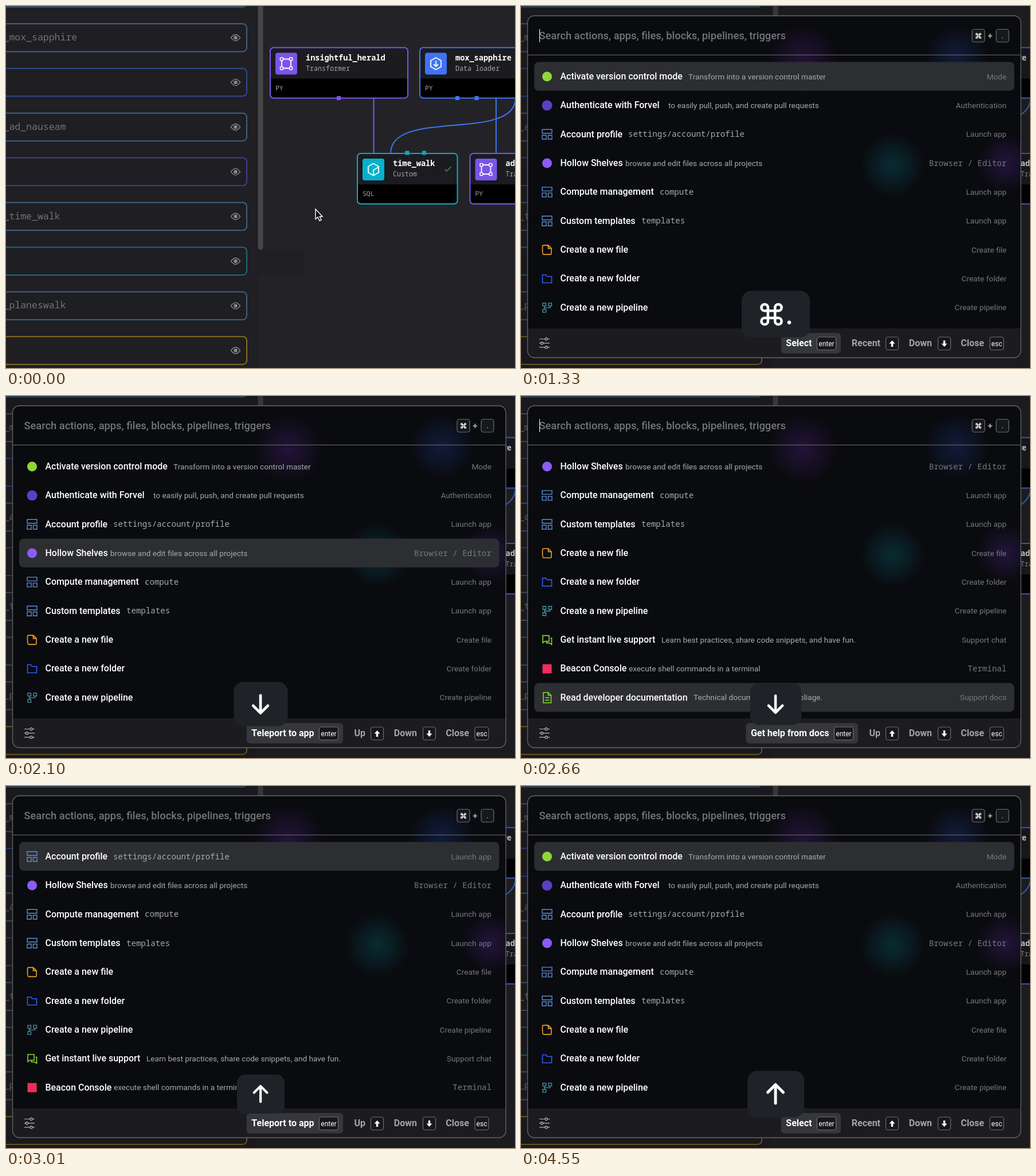
Animation, 888 px wide and 631 px high, one loop 4.62 s. Source, as an HTML page with a canvas:

```html
<!DOCTYPE html>
<html lang="en">
<head>
<meta charset="utf-8">
<title>Command palette</title>
<style>
html, body { margin: 0; width: 100%; height: 100%; overflow: hidden; background: #222226; }
canvas { display: block; width: 888px; height: 631px; }
</style>
</head>
<body>
<canvas id="stage" width="888" height="631"></canvas>
<script>
const c = document.getElementById('stage').getContext('2d');
const LOOP = 4620;
const SANS = 'Roboto, sans-serif';
const MONO = '"Noto Sans Mono", "DejaVu Sans Mono", monospace';
const PURPLE = '#7b54ea', BLUE = '#4073f4', TEAL = '#0fa9bf';

function text(s, x, y, font, color, align = 'left') {
  c.font = font;
  c.fillStyle = color;
  c.textAlign = align;
  c.fillText(s, x, y);
}

function box(x, y, w, h, r, fill, stroke, lw = 1) {
  c.beginPath();
  c.roundRect(x, y, w, h, r);
  if (fill) { c.fillStyle = fill; c.fill(); }
  if (stroke) { c.strokeStyle = stroke; c.lineWidth = lw; c.stroke(); }
}

function line(d, color, lw = 1.5) {
  c.strokeStyle = color;
  c.lineWidth = lw;
  c.stroke(new Path2D(d));
}

function disc(x, y, r, fill) {
  c.beginPath();
  c.arc(x, y, r, 0, 7);
  c.fillStyle = fill;
  c.fill();
}

function at(x, y, scale, draw) {
  c.save();
  c.translate(x, y);
  c.scale(scale, scale);
  draw();
  c.restore();
}

// Linear interpolation through [time, value] points
function track(points, t) {
  for (let i = 1; i < points.length; i++) {
    const [a, u] = points[i - 1], [b, v] = points[i];
    if (t < b) return u + (v - u) * Math.max(0, (t - a) / (b - a));
  }
  return points[points.length - 1][1];
}

/* ---------- page behind the palette ---------- */

const cards = [
  ['', '#41607f'], ['_mox_sapphire', '#41607f'], ['', '#2f4b90'],
  ['_ad_nauseam', '#41607f'], ['', '#4b3a8c'], ['_time_walk', '#41607f'],
  ['', '#1f6a77'], ['_planeswalk', '#41607f'], ['', '#8a6d22']
];

function eye(x, y) {
  line(`M${x - 8} ${y}Q${x} ${y - 11} ${x + 8} ${y}Q${x} ${y + 11} ${x - 8} ${y}Z`, '#88888c', 1.4);
  disc(x, y, 3.2, '#88888c');
}

const glyphs = {
  transform() {
    line('M-8-8H8V8H-8Z', '#fff', 1.8);
    for (const x of [-8, 8]) for (const y of [-8, 8]) box(x - 2.5, y - 2.5, 5, 5, 1, PURPLE, '#fff', 1.6);
  },
  load() {
    line('M0-10.5L9-5.3V5.3L0 10.5L-9 5.3V-5.3ZM0-5V4.5M-4 1L0 5L4 1', '#fff', 1.8);
  },
  cube() {
    line('M0-10.5L9-5.3V5.3L0 10.5L-9 5.3V-5.3ZM0 10V1L8.5-4', '#fff', 1.8);
  }
};

function node(x, y, w, color, tile, glyph, title, kind, lang) {
  box(x, y, w, 88, 6, '#1b1b20');
  box(x, y + 54, w, 34, [0, 0, 6, 6], '#000');
  box(x, y, w, 88, 6, null, color, 2);
  box(x + 9, y + 9, 38, 38, 4, tile);
  at(x + 28, y + 28, 1, glyphs[glyph]);
  text(title, x + 62, y + 22, `700 13.6px ${MONO}`, '#fff');
  text(kind, x + 62, y + 40, `400 11.7px ${MONO}`, '#a4a4a8');
  text(lang, x + 9, y + 74, `400 11.4px ${MONO}`, '#a4a4a8');
}

function port(x, y, color) {
  c.fillStyle = color;
  c.fillRect(x - 3.5, y - 3.5, 7, 7);
}

function page() {
  c.fillStyle = '#232327';
  c.fillRect(0, 0, 888, 631);
  c.fillStyle = '#1f1f24';
  c.fillRect(0, 0, 440, 631);
  c.fillRect(440, 424, 80, 44);
  box(439.5, -10, 9, 435, 4.5, '#464649');

  cards.forEach(([name, color], i) => {
    const y = -47 + i * 77.9;
    box(-20, y, 440, 48.5, 7, '#1e1e23', color, 2);
    text(name, -4.5, y + 29, `400 16.5px ${MONO}`, '#737377');
    eye(400.5, y + 24.3);
  });

  line('M641.5 160V257', PURPLE, 2);
  line('M855 160V257M889 160C889 238 671 178 671 257', BLUE, 2);
  node(461, 72.5, 240, PURPLE, PURPLE, 'transform', 'insightful_herald', 'Transformer', 'PY');
  node(722, 72.5, 210, BLUE, BLUE, 'load', 'mox_sapphire', 'Data loader', 'PY');
  node(613, 257, 174.5, TEAL, '#05b2cc', 'cube', 'time_walk', 'Custom', 'SQL');
  node(809.5, 257, 200, PURPLE, PURPLE, 'transform', 'ad_nauseam', 'Transformer', 'PY');
  line('M765.5 284.5L769 288L776.5 280', '#2fa81c', 1.5);
  port(580.5, 160.5, PURPLE);
  port(787.5, 160.5, BLUE);
  port(821, 160.5, BLUE);
  port(700, 256, TEAL);
  port(729.5, 256, TEAL);
}

function pointer(alpha) {
  c.globalAlpha = alpha;
  const p = new Path2D('M540 354V371.5L544 368L547 374.5L550 373L547.2 367H552Z');
  c.fillStyle = '#111';
  c.fill(p);
  c.strokeStyle = '#fff';
  c.lineWidth = 1.4;
  c.stroke(p);
  c.globalAlpha = 1;
}

/* ---------- palette ---------- */

const icons = {
  mode() { disc(0, 0, 8.5, '#8fd63a'); },
  auth() { disc(0, 0, 9, '#5d3fc4'); },
  library() { disc(0, 0, 8.5, '#8b5cf6'); },
  terminal() { box(-8, -8, 16, 16, 0, '#ee2f5b'); },
  app() { line('M-8.5-8.5H8.5V-2H-8.5ZM-8.5 1.5H-1.5V8.5H-8.5ZM2 1.5H8.5V8.5H2Z', '#5c8fd6', 1.4); },
  file() {
    line('M-6-8H2L7.5-2.5V6Q7.5 8 5.5 8H-6Q-8 8-8-0V-6Q-8-8-6-8ZM2-8V-2.5H7.5', '#f0a51e', 1.6);
  },
  folder() { line('M-8-7H-2L0-4H8V7H-8Z', '#2f5cf5', 1.6); },
  flow() {
    line('M-7.5-8H-2V-3H-7.5ZM2.5-8H8V-3H2.5ZM-7.5 3H-2V8H-7.5ZM-4.8-3V3M5.3-3V0H-4.8', '#4799a8', 1.3);
  },
  chat() { line('M-7.5-7.5H3.5V2.5H-4L-7.5 5ZM6-3H8V8L4.5 5.5H-1V3', '#84dc2a', 1.6); },
  docs() { line('M-6.5-9H2L7-4V9H-6.5ZM2-9V-4H7M-3.5 0H4M-3.5 4.5H4', '#84dc2a', 1.5); }
};

// icon, title, detail, detail x, right label, mono detail, mono label, button
const items = [
  ['mode', 'Activate version control mode', 'Transform into a version control master', 292, 'Mode', 0, 0, 'Select'],
  ['auth', 'Authenticate with Forvel', 'to easily pull, push, and create pull requests', 257, 'Authentication', 0, 0, 'Conjure'],
  ['app', 'Account profile', 'settings/account/profile', 187, 'Launch app', 1, 0, 'Teleport to app'],
  ['library', 'Hollow Shelves', 'browse and edit files across all projects', 182, 'Browser / Editor', 0, 1, 'Teleport to app'],
  ['app', 'Compute management', 'compute', 242, 'Launch app', 1, 0, 'Teleport to app'],
  ['app', 'Custom templates', 'templates', 210, 'Launch app', 1, 0, 'Teleport to app'],
  ['file', 'Create a new file', '', 0, 'Create file', 0, 0, 'Conjure'],
  ['folder', 'Create a new folder', '', 0, 'Create folder', 0, 0, 'Conjure'],
  ['flow', 'Create a new pipeline', '', 0, 'Create pipeline', 0, 0, 'Conjure'],
  ['chat', 'Get instant live support', 'Learn best practices, share code snippets, and have fun.', 245, 'Support chat', 0, 0, 'Conjure'],
  ['terminal', 'Beacon Console', 'execute shell commands in a terminal', 188, 'Terminal', 0, 1, 'Teleport to app'],
  ['docs', 'Read developer documentation', 'Technical documentation for Foliage.', 301, 'Support docs', 0, 0, 'Get help from docs']
];

const face = mono => mono ? `400 14.1px ${MONO}` : `400 13.65px ${SANS}`;

function glow(x, y, r, rgb, alpha) {
  const g = c.createRadialGradient(x, y, 0, x, y, r);
  g.addColorStop(0, `rgba(${rgb},${alpha})`);
  g.addColorStop(0.5, `rgba(${rgb},${alpha * 0.55})`);
  g.addColorStop(1, `rgba(${rgb},0)`);
  c.fillStyle = g;
  c.fillRect(x - r, y - r, 2 * r, 2 * r);
}

function row([icon, title, detail, x, label, monoDetail, monoLabel], y, active) {
  if (active) box(23, y - 25, 837.5, 50.3, 8, '#2d2e32');
  at(45.5, y + 0.5, 1, icons[icon]);
  text(title, 68.5, y + 5.5, `500 15.95px ${SANS}`, '#fff');
  text(detail, x, y + 5, face(monoDetail), '#a9aaae');
  text(label, 847, y + 5, face(monoLabel), '#77787c', 'right');
}

function command(lw) {
  const d = 'M6.5-12.5V12.5A6 6 0 1 0 12.5 6.5H-12.5A6 6 0 1 0-6.5 12.5V-12.5A6 6 0 1 0-12.5-6.5H12.5A6 6 0 1 0 6.5-12.5Z';
  line(d, '#fff', lw);
}

function keycap(x, y, w, label) {
  box(x, y, w, 22.5, 4, '#17181b', '#6d6e72', 1.2);
  if (label) text(label, x + w / 2, y + 15.5, `400 12px ${SANS}`, '#fff', 'center');
}

function smallArrow(x, y, dir) {
  at(x, y, 1, () => {
    c.scale(1, dir);
    c.fillStyle = '#fff';
    c.fill(new Path2D('M0-5.5L5 0H1.7V5.5H-1.7V0H-5Z'));
  });
}

function footer(sel) {
  const font = `700 16px ${SANS}`, gray = '#a3a4a9';
  const edge = sel ? 537.5 : 507.5, label = items[sel][7];
  box(12, 562, 860, 51, [0, 0, 11, 11], '#1c1c20');
  for (let i = 0; i < 3; i++) {
    const y = 580.5 + i * 7.2, x = [44, 36.5, 44][i];
    line(`M32 ${y}H50`, '#b5b6ba', 1.2);
    c.beginPath();
    c.arc(x, y, 2.1, 0, 7);
    c.fillStyle = '#1c1c20';
    c.fill();
    c.stroke();
  }
  c.font = font;
  const w = c.measureText(label).width;
  box(edge - w - 8.5, 570, w + 59, 35.5, 6, '#36373c');
  text(label, edge, 593, font, '#fff', 'right');
  keycap(edge + 9, 577, 33, 'enter');
  text(sel ? 'Up' : 'Recent', 627, 593, font, gray, 'right');
  text('Down', 717, 593, font, gray, 'right');
  text('Close', 808, 593, font, gray, 'right');
  keycap(636.5, 577, 22, '');
  smallArrow(647.5, 588.5, 1);
  keycap(727.5, 577, 22, '');
  smallArrow(738.5, 588.5, -1);
  keycap(818, 577, 24, 'esc');
}

function selection(t) {
  if (t < 1890) return 0;
  if (t < 2730) return Math.min(11, Math.max(1, 1 + Math.floor((t - 1960) / 70)));
  return Math.max(0, 10 - Math.floor((t - 2730) / 35));
}

function caret(t) {
  if (t < 1820 || (t >= 2310 && t < 2870)) return 1;
  if (t < 3920 || t >= 4550) return 0;
  return t < 4480 ? 1 : 0.5;
}

function palette(t) {
  const sel = selection(t);
  const top = t < 2730 ? Math.max(0, sel - 8) : Math.min(3, sel);

  c.fillStyle = 'rgba(8,8,12,.25)';
  c.fillRect(0, 0, 888, 631);
  c.save();
  box(11.5, 17, 860.5, 596, 12, '#0a0b0f');
  c.clip();
  glow(492, 92, 60, '84,36,140', 0.32);
  glow(760, 88, 56, '30,62,150', 0.32);
  glow(648, 277, 56, '6,96,108', 0.38);
  glow(845, 274, 50, '84,40,150', 0.32);

  text('Search actions, apps, files, blocks, pipelines, triggers', 31.5, 58, `500 18.3px ${SANS}`, '#737478');
  c.globalAlpha = caret(t);
  c.fillStyle = '#fff';
  c.fillRect(32, 40, 1, 23);
  c.globalAlpha = 1;
  keycap(787, 40.5, 22, '');
  at(798, 52, 0.24, () => command(5.5));
  text('+', 818.5, 57, `500 15px ${SANS}`, '#b5b6ba', 'center');
  keycap(829, 40.5, 22, '.');
  line('M11 85.3H872', '#5c5e62', 1.3);

  items.slice(top, top + 9).forEach((item, i) => row(item, 122.5 + i * 50.35, top + i === sel));
  footer(sel);
  c.restore();
  box(11.5, 17, 860.5, 596, 12, null, '#64666a', 1.3);
}

/* ---------- pressed key overlay ---------- */

const press = [[1050, 0.8], [1190, 1], [2030, 1], [2170, 0.9], [2660, 0.9], [2800, 0.84], [3080, 0.84], [3430, 1]];

function pressedKey(t) {
  const chord = t < 1820, w = chord ? 119 : 99;
  c.globalAlpha = track([[1050, 0], [1190, 1]], t);
  at(444.5, 537, track(press, t), () => {
    box(-w / 2, -40.5, w, 81, 17, '#1f2327');
    c.lineCap = 'round';
    c.lineJoin = 'round';
    if (chord) {
      at(-7.5, 0.5, 0.95, () => command(4.8));
      text('.', 23.5, 18, '700 40px Inter, sans-serif', '#fff', 'center');
    } else {
      c.scale(1, t < 2730 ? 1 : -1);
      line('M-0.5-16V16M-14 3L-0.5 16.5L13 3', '#fff', 5);
    }
  });
  c.globalAlpha = 1;
}

const start = performance.now();

function frame() {
  const t = (performance.now() - start) % LOOP;
  c.clearRect(0, 0, 888, 631);
  page();
  if (t < 1050) pointer(track([[910, 1], [1050, 0]], t));
  if (t >= 1330) palette(t);
  if (t >= 1050) pressedKey(t);
  requestAnimationFrame(frame);
}
frame();
</script>
</body>
</html>
```
